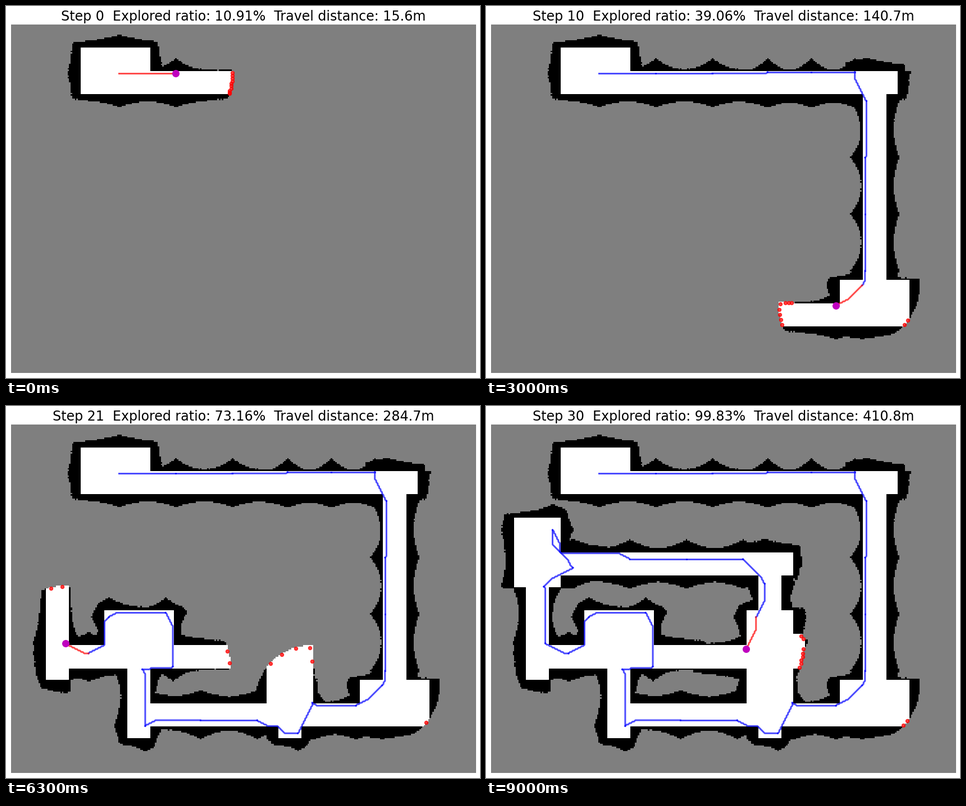
A matplotlib script that plays this animation: 844 by 663 pixels, repeating every 9300 ms.

```python
import numpy as np
import matplotlib.pyplot as plt
from matplotlib.animation import FuncAnimation

W, H, DPI = 844, 663, 100
COLS, ROWS = 320, 240
CELL = 0.4              # metres per cell
REACH = 40              # sensor range in cells
DEPTH = 10              # how far a ray enters a wall
UNKNOWN, FREE, WALL = 127, 255, 0
MOVES = [(i, j) for j in (-1, 0, 1) for i in (-1, 0, 1) if i or j]

# Rooms and corridors as x0, x1, y0, y1 in blocks of 8 cells
ROOMS = [
    (6, 12, 2, 6), (6, 35, 4, 6), (32, 34, 6, 22), (30, 36, 22, 26),
    (10, 36, 24, 26), (23, 25, 26, 27), (22, 26, 16, 24), (26, 27, 18, 21),
    (10, 12, 21, 27), (8, 14, 16, 21), (3, 22, 19, 21), (3, 5, 14, 22),
    (2, 6, 8, 14), (6, 26, 11, 13), (23, 25, 13, 16),
]

# Cells where the robot stops to look around
STOPS = [
    (74, 33), (113, 33), (152, 33), (190, 32), (220, 32), (250, 32), (258, 52),
    (257, 91), (257, 130), (257, 169), (255, 179), (237, 193), (207, 191),
    (197, 212), (169, 203), (130, 203), (92, 207), (90, 168), (111, 166),
    (106, 129), (67, 132), (53, 157), (37, 150), (36, 111), (56, 98), (42, 72),
    (95, 92), (134, 92), (173, 92), (188, 109), (182, 132), (175, 154),
]


def build_truth():
    truth = np.full((ROWS, COLS), WALL, np.uint8)
    for x0, x1, y0, y1 in ROOMS:
        truth[8 * y0:8 * y1, 8 * x0:8 * x1] = FREE
    return truth


def shifted(padded, i, j):
    return padded[1 + j:1 + j + ROWS, 1 + i:1 + i + COLS]


def cast(truth, belief, x, y, x1, y1):
    """Walk one ray cell by cell, one axis at a time."""
    dx, dy = abs(x1 - x), abs(y1 - y)
    sx = 1 if x1 > x else -1
    sy = 1 if y1 > y else -1
    err, hits = dx - dy, 0
    while 0 <= x < COLS and 0 <= y < ROWS and (x, y) != (x1, y1):
        k = truth[y][x]
        if k == WALL:
            hits += 1
            if hits >= DEPTH:
                break
        elif hits:
            break
        belief[y, x] = k
        if err > 0:
            x += sx
            err -= 2 * dy
        else:
            y += sy
            err += 2 * dx


def sense(truth, belief, pos):
    x, y = pos
    for a in np.radians(np.arange(0, 360, 0.5)):
        cast(truth, belief, x, y,
             round(x + REACH * np.cos(a)), round(y + REACH * np.sin(a)))


def cost_to(truth, goal, sweeps=70):
    """Length of the shortest way to the goal from every nearby cell."""
    cost = np.full((ROWS, COLS), np.inf)
    cost[goal[1], goal[0]] = 0
    for _ in range(sweeps):
        padded = np.pad(cost, 1, constant_values=np.inf)
        for i, j in MOVES:
            np.minimum(cost, shifted(padded, i, j) + np.hypot(i, j), out=cost)
        cost[truth == WALL] = np.inf
    return cost


def plan(truth, start, goal):
    """Shortest path, keeping to the axes until a 2:1 slope leads to the goal."""
    cost = cost_to(truth, goal)
    path = [start]
    while path[-1] != goal:
        x, y = path[-1]
        minor, major = sorted((abs(goal[0] - x), abs(goal[1] - y)))
        straight = major >= 2 * minor
        best = [(i, j) for i, j in MOVES
                if abs(cost[y + j, x + i] + np.hypot(i, j) - cost[y, x]) < 1e-6]
        i, j = min(best, key=lambda m: (m[0] * m[1] == 0) != straight)
        path.append((x + i, y + j))
    return np.array(path)


def frontier_cells(belief):
    padded = np.pad((belief == UNKNOWN).astype(int), 1)
    near = sum(shifted(padded, i, j) for i, j in MOVES)
    y, x = np.nonzero((belief == FREE) & (near > 1) & (near < 8))
    return np.column_stack([x, y]).astype(float)


def cluster(pts, k=10, tries=30):
    """Best of several k-means runs."""
    if len(pts) <= k:
        return pts
    rng = np.random.default_rng(0)
    best, best_cost = pts, np.inf

    def gaps(mid):
        return ((pts[:, None] - mid[None]) ** 2).sum(2)

    for _ in range(tries):
        mid = pts[[rng.integers(len(pts))]]
        while len(mid) < k:
            d = gaps(mid).min(1)
            mid = np.vstack([mid, pts[rng.choice(len(pts), p=d / d.sum())]])
        for _ in range(25):
            own = gaps(mid).argmin(1)
            new = np.array([pts[own == i].mean(0) if (own == i).any() else mid[i]
                            for i in range(k)])
            if np.allclose(new, mid):
                break
            mid = new
        cost = gaps(mid).min(1).sum()
        if cost < best_cost:
            best, best_cost = mid, cost
    return best


def explore():
    truth = build_truth()
    lookup, total = truth.tolist(), (truth == FREE).sum()
    belief = np.full((ROWS, COLS), UNKNOWN, np.uint8)
    sense(lookup, belief, STOPS[0])
    dist, steps = 0.0, []
    for n, (a, b) in enumerate(zip(STOPS, STOPS[1:])):
        path = plan(truth, a, b)
        dist += CELL * np.hypot(*np.diff(path, axis=0).T).sum()
        sense(lookup, belief, b)
        ratio = 100 * (belief == FREE).sum() / total
        label = (f"Step {n}  Explored ratio: {ratio:.4g}%"
                 f"  Travel distance: {dist:.4g}m")
        steps.append((belief.copy(), path, cluster(frontier_cells(belief)), label))
    return steps


steps = explore()

fig = plt.figure(figsize=(W / DPI, H / DPI), dpi=DPI, facecolor="white")
ax = fig.add_axes([8.55 / W, 1 - 654.45 / H, 828 / W, 621 / H])
ax.axis("off")
grid = ax.imshow(steps[0][0], cmap="gray", vmin=0, vmax=255,
                 interpolation="nearest", aspect="auto")
ax.set_autoscale_on(False)
title = fig.text(422.4 / W, 1 - 26 / H, "", fontsize=17.1, ha="center",
                 va="baseline", family="DejaVu Sans")
legs = [ax.plot(*path.T, lw=2.15, alpha=0.7, zorder=2)[0]
        for _, path, _, _ in steps]
dots = ax.scatter([], [], s=18, c="red", alpha=0.75, linewidths=1.1, zorder=3)
robot, = ax.plot([], [], "mo", ms=8.4, zorder=5)


def draw(n):
    belief, path, targets, label = steps[n]
    grid.set_data(belief)
    title.set_text(label)
    for i, leg in enumerate(legs):
        leg.set_visible(i <= n)
        leg.set_color("red" if i == n else "blue")
    dots.set_offsets(targets)
    robot.set_data(path[-1:, 0], path[-1:, 1])
    return [grid, title, dots, robot, *legs]


anim = FuncAnimation(fig, draw, frames=len(steps), interval=300,
                     init_func=lambda: draw(0), repeat=True)
plt.show()
```
